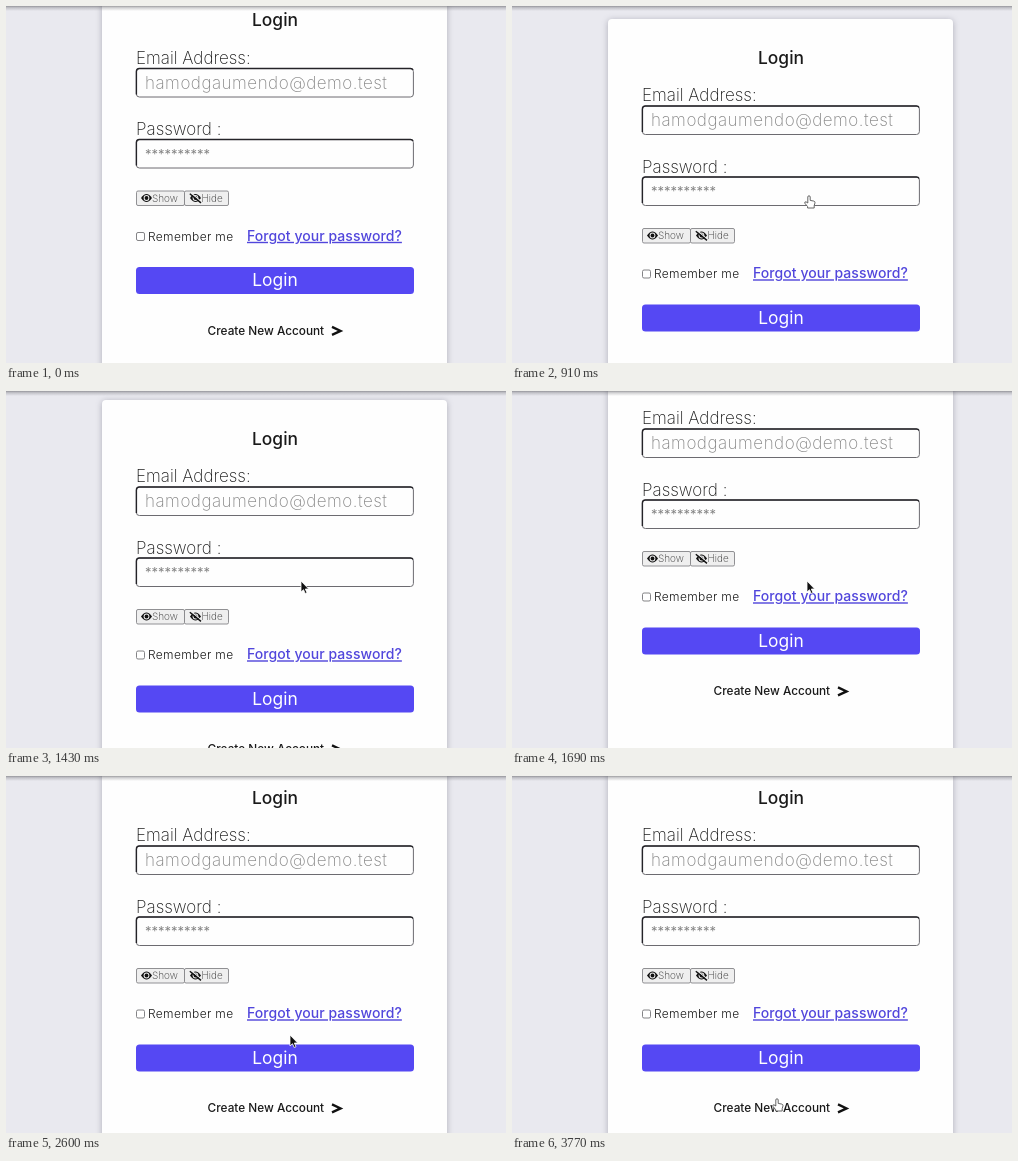
Animation of 500x357 px, one loop 4290 ms. Source, as an HTML page:

```html
<!DOCTYPE html>
<html lang="en">
<head>
<meta charset="utf-8">
<title>Login form</title>
<style>
  html, body { margin: 0; width: 100%; height: 100%; overflow: hidden; background: #e9e9ef; }
  svg { display: block; width: 100vw; height: 100vh; }
  text { font-family: Inter, "Open Sans", sans-serif; fill: #1a1a1a; white-space: pre; }
  .label { font-size: 17px; font-weight: 250; }
  .hint { fill: #858585; }
  .title { font-size: 17.4px; font-weight: 450; }
  .input rect { fill: #fefefe; stroke: #6c6b70; stroke-width: 1; }
  .input path { fill: none; stroke: #242328; stroke-width: 1.4; }
  .btn { fill: #efefef; stroke: #858588; stroke-width: .9; }
  .small { font-size: 10px; font-weight: 250; fill: #333; }
  .link { font-size: 14px; font-weight: 480; letter-spacing: .06px; fill: #5146dc; text-decoration: underline; text-decoration-thickness: 1px; }
  .link.hover { fill: #0c0c0c; }
  .card { fill: #fefefe; filter: drop-shadow(0 1px 3px rgba(60, 60, 80, .34)); }
</style>
</head>
<body>
<svg viewBox="0 0 500 357" preserveAspectRatio="none">
  <defs>
    <linearGradient id="shade" x2="0" y2="1">
      <stop offset="0" stop-color="#606066" stop-opacity=".62"/>
      <stop offset=".35" stop-color="#606066" stop-opacity=".28"/>
      <stop offset="1" stop-color="#606066" stop-opacity="0"/>
    </linearGradient>
    <g id="eye">
      <path d="M0 4.5Q5.5-3.6 11 4.5Q5.5 12.6 0 4.5z" fill="#111"/>
      <circle cx="5.5" cy="4.5" r="2.9" fill="#efefef"/>
      <circle cx="5.5" cy="4.5" r="1.9" fill="#111"/>
    </g>
    <g id="field" class="input">
      <rect width="277" height="28.5" rx="3"/>
      <path d="M0 26V3Q0 0 3 0H274Q276 0 276.6 1.5"/>
    </g>
  </defs>
  <rect width="500" height="357" fill="#e9e9ef"/>

  <g id="page">
    <rect class="card" x="96" y="-17" width="345" height="480" rx="4"/>
    <text class="title" x="269" y="27.7" text-anchor="middle">Login</text>

    <text class="label" x="130" y="65.3">Email Address:</text>
    <use href="#field" x="130.4" y="70"/>
    <text class="label hint" x="139" y="90" letter-spacing=".5">hamodgaumendo@demo.test</text>

    <text class="label" x="130" y="136.5">Password :</text>
    <use href="#field" x="130.4" y="141"/>
    <text class="hint" x="139" y="160" font-size="13">**********</text>

    <rect class="btn" x="130.5" y="192.5" width="48" height="14.5" rx="1.5"/>
    <use href="#eye" x="135" y="195"/>
    <text class="small" x="146" y="203.3">Show</text>
    <rect class="btn" x="178.5" y="192.5" width="44" height="14.5" rx="1.5"/>
    <use href="#eye" x="184" y="195"/>
    <path d="M184.6 194.2L195.6 203.4" stroke="#efefef" stroke-width="1.2"/>
    <path d="M183.8 195.2L195 204.4" stroke="#111" stroke-width="1.4"/>
    <text class="small" x="195.5" y="203.3">Hide</text>

    <rect x="130.5" y="234" width="8" height="8" rx="1.5" fill="#fff" stroke="#77777a" stroke-width=".9"/>
    <text x="142" y="242.3" font-size="12" font-weight="270" letter-spacing=".35">Remember me</text>
    <text class="link" id="link" x="241" y="242.3">Forgot your password?</text>

    <rect x="130" y="268.4" width="278" height="27" rx="3.5" fill="#5548f3"/>
    <text x="269" y="287.7" font-size="17.4" text-anchor="middle" style="fill:#fff">Login</text>

    <text x="201.6" y="336" font-size="11.8" font-weight="450">Create New Account</text>
    <path d="M326 328.4L334.6 332.4L326 336.4" fill="none" stroke="#111" stroke-width="2.3"/>
  </g>

  <rect width="500" height="5" fill="url(#shade)"/>

  <g id="cursor" stroke-linejoin="round">
    <path id="hand" fill="#fff" stroke="#555" stroke-width=".9"
      d="M-1.2 7V1a1.2 1.2 0 0 1 2.4 0V4.4L4.8 5.1Q6.1 5.4 6 6.8L5.2 9.6V12H-1.4V10.6L-4.2 7.2Q-4.6 5.6-3 5.8z"/>
    <path id="arrow" fill="#111" stroke="#fff" stroke-width=".8"
      d="M0 0V11L2.5 8.7L4.2 12.5L6 11.7L4.3 8H7.7z"/>
  </g>
</svg>
<script>
  const LOOP = 4290;
  // time, page offset, pointer, pointer x, pointer y, link hovered
  const STEPS = [
    [0, -7.5, '', 0, 0, 0],
    [130, -26, 'hand', 297, 190, 0],
    [260, -44, 'hand', 297, 190, 1],
    [650, 8.5, 'hand', 297, 190, 1],
    [780, 22, 'hand', 297, 190, 0],
    [910, 30, 'hand', 297, 190, 0],
    [1040, 33, 'hand', 297, 190, 0],
    [1170, 34, 'arrow', 295, 190, 0],
    [1430, 26, 'arrow', 295, 190, 0],
    [1560, -4, 'arrow', 295, 190, 0],
    [1690, -32, 'arrow', 295, 190, 0],
    [1820, -44, 'arrow', 295, 190, 1],
    [1950, 0, 'arrow', 295, 190, 1],
    [2340, 0, 'arrow', 294, 206, 0],
    [2470, 0, 'hand', 289, 234, 1],
    [2600, 0, 'arrow', 284, 259, 0],
    [2730, 0, 'hand', 278, 284, 0],
    [2860, 0, 'arrow', 272, 306, 0],
    [2990, 0, 'arrow', 269, 314, 0],
    [3250, 0, 'hand', 267, 319, 0],
    [3380, 0, 'hand', 266, 321, 0],
    [3640, 0, 'hand', 265, 322, 0],
    [3770, 0, 'hand', 265, 323, 0]
  ];
  const el = id => document.getElementById(id);
  const show = (id, on) => el(id).setAttribute('visibility', on ? 'visible' : 'hidden');
  const move = (id, x, y) => el(id).setAttribute('transform', `translate(${x} ${y})`);

  function draw(ms) {
    const t = ms % LOOP;
    const [, dy, pointer, x, y, hover] = STEPS.findLast(s => s[0] <= t);
    move('page', 0, dy);
    move('cursor', x, y);
    show('hand', pointer === 'hand');
    show('arrow', pointer === 'arrow');
    el('link').classList.toggle('hover', !!hover);
  }

  const start = performance.now();
  function tick() {
    draw(performance.now() - start);
    requestAnimationFrame(tick);
  }
  tick();
</script>
</body>
</html>
```
